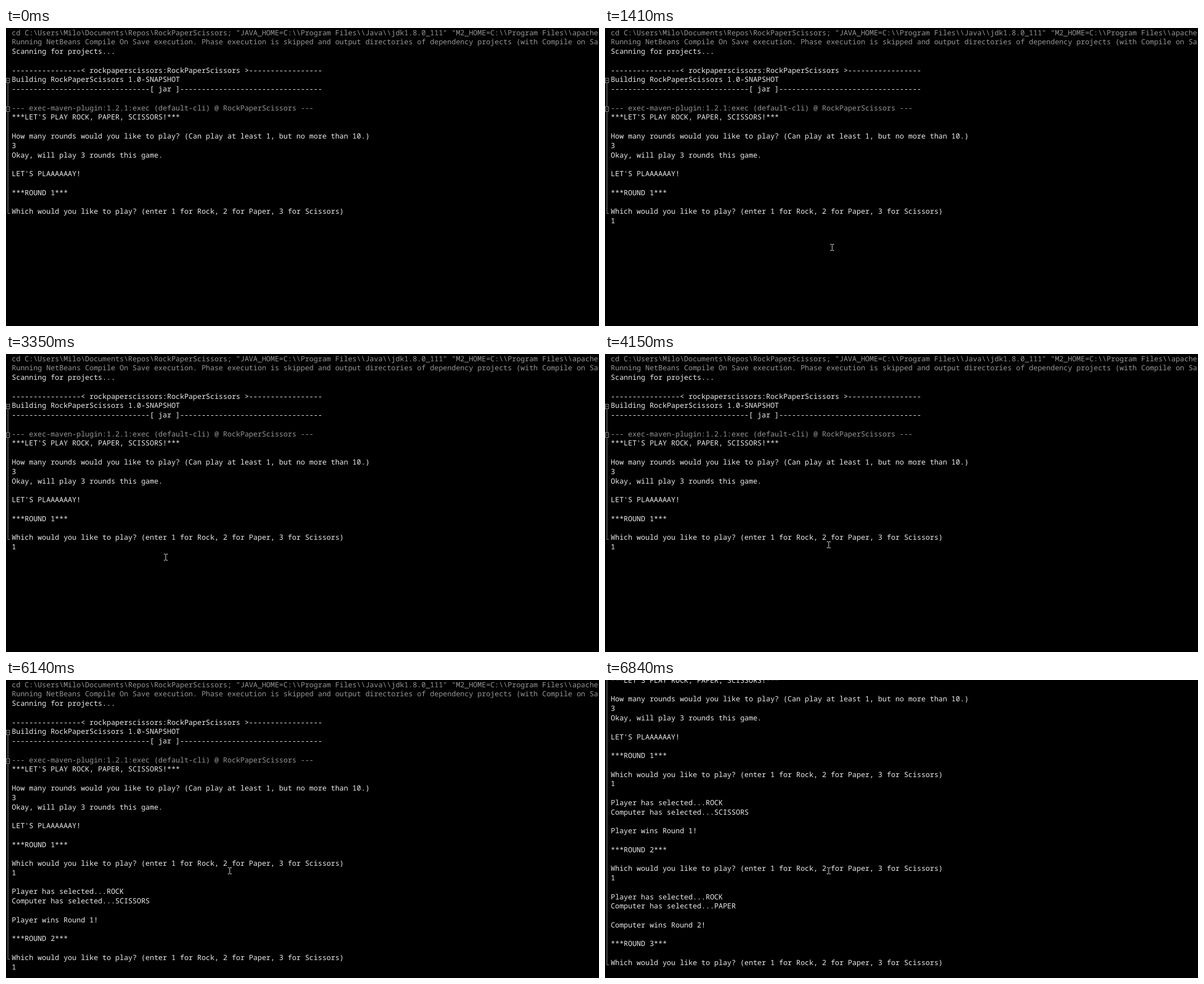
These frames come from a looping animation (1056x531 px, 8 s). An HTML page with a canvas:

```html
<!DOCTYPE html>
<html lang="en">
<head>
<meta charset="utf-8">
<title>Rock, Paper, Scissors console</title>
<style>
html, body { margin: 0; width: 100%; height: 100%; overflow: hidden; background: #000; }
canvas { display: block; }
</style>
</head>
<body>
<canvas id="stage" width="1056" height="531"></canvas>
<script>
const ctx = document.getElementById('stage').getContext('2d', { alpha: false });
const W = 1056, H = 531, LOOP = 8000;
const LEFT = 10.3, BASE = 12.5, PITCH = 16.77;
const FIT = 31, BOTTOM = 23;
const FONT = '12.81px "Noto Sans Mono", "DejaVu Sans Mono", monospace';
const TEXT = '#ececec', DIM = '#969696', GUTTER = '#8c8c8c', POINTER = '#d8d8d8';

const ASK = 'Which would you like to play? (enter 1 for Rock, 2 for Paper, 3 for Scissors)';
const dash = n => '-'.repeat(n);
const round = n => ['', `***ROUND ${n}***`, '', ASK];
const result = (n, computer, winner) => [
  '', 'Player has selected...ROCK', `Computer has selected...${computer}`,
  '', `${winner} wins Round ${n}!`, ...round(n + 1)
];

// Console output: each block appears at its time
const blocks = [
  { time: 0, lines: [
    'cd C:\\Users\\Milo\\Documents\\Repos\\RockPaperScissors; "JAVA_HOME=C:\\\\Program Files\\\\Java\\\\jdk1.8.0_111" "M2_HOME=C:\\\\Program Files\\\\apache',
    'Running NetBeans Compile On Save execution. Phase execution is skipped and output directories of dependency projects (with Compile on Sa',
    'Scanning for projects...',
    '',
    dash(16) + '< rockpaperscissors:RockPaperScissors >' + dash(17),
    'Building RockPaperScissors 1.0-SNAPSHOT',
    dash(32) + '[ jar ]' + dash(33),
    '',
    '--- exec-maven-plugin:1.2.1:exec (default-cli) @ RockPaperScissors ---',
    "***LET'S PLAY ROCK, PAPER, SCISSORS!***",
    '',
    'How many rounds would you like to play? (Can play at least 1, but no more than 10.)',
    '3',
    'Okay, will play 3 rounds this game.',
    '',
    "LET'S PLAAAAAAY!",
    ...round(1)
  ] },
  { time: 1410, lines: ['1'] },
  { time: 4380, lines: result(1, 'SCISSORS', 'Player') },
  { time: 6140, lines: ['1'] },
  { time: 6840, lines: result(2, 'PAPER', 'Computer') }
];
const isDim = line => /^(cd |Running|--- )/.test(line);
const isFold = line => /^(Building|--- )/.test(line);

// Pointer glides: cubic curves sampled in equal steps
const glides = [
  { from: 70, to: 550, steps: 6, x: [498, 430, 380, 404], y: [472, 395, 375, 391] },
  { from: 2800, to: 3590, steps: 10, x: [358, 235, 250, 395], y: [384, 420, 330, 340] }
];
const NUDGE = 3730, BLINK = [700, 800];

function bezier([a, b, c, d], u) {
  const v = 1 - u;
  return a * v ** 3 + 3 * b * v * v * u + 3 * c * v * u * u + d * u ** 3;
}

function pointerAt(t) {
  const glide = glides.findLast(g => g.from <= t);
  if (!glide || (t >= BLINK[0] && t < BLINK[1])) return null;
  const progress = Math.min(1, (t - glide.from) / (glide.to - glide.from));
  const u = Math.floor(progress * glide.steps) / glide.steps;
  return {
    x: Math.round(bezier(glide.x, u)) + (t >= NUDGE ? 3 : 0),
    y: Math.round(bezier(glide.y, u))
  };
}

function drawText(lines, baseline) {
  ctx.font = FONT;
  ctx.textRendering = 'geometricPrecision';
  lines.forEach((line, row) => {
    ctx.fillStyle = isDim(line) ? DIM : TEXT;
    ctx.fillText(line, LEFT, baseline(row));
  });
}

function drawGutter(lines, baseline) {
  const middle = row => Math.round(baseline(row)) - 3;
  const top = middle(lines.findIndex(isFold));
  const end = Math.round(baseline(lines.lastIndexOf(ASK)) - 1.5);
  ctx.fillStyle = GUTTER;
  ctx.fillRect(3, top, 1, end - top + 1);
  ctx.fillRect(3, end, 4, 1);
  lines.forEach((line, row) => {
    if (!isFold(line)) return;
    const y = middle(row);
    ctx.fillStyle = '#000';
    ctx.fillRect(0, y - 4, 7, 9);
    ctx.strokeStyle = ctx.fillStyle = GUTTER;
    ctx.strokeRect(0.5, y - 3.5, 6, 8);
    ctx.fillRect(2, y, 3, 1);
  });
}

function drawPointer({ x, y }) {
  ctx.fillStyle = POINTER;
  ctx.fillRect(x, y - 5, 1, 10);
  for (const edge of [y - 6, y + 5]) {
    ctx.fillRect(x - 3, edge, 3, 1);
    ctx.fillRect(x + 1, edge, 3, 1);
  }
}

function draw(t) {
  const lines = blocks.filter(b => b.time <= t).flatMap(b => b.lines);
  const last = BASE + (lines.length - 1) * PITCH;
  const scroll = lines.length > FIT ? last - (H - BOTTOM) : 0;
  const baseline = row => BASE + row * PITCH - scroll;
  const pointer = pointerAt(t);

  ctx.fillStyle = '#000';
  ctx.fillRect(0, 0, W, H);
  drawText(lines, baseline);
  drawGutter(lines, baseline);
  if (pointer) drawPointer(pointer);
}

const start = performance.now();
function tick() {
  draw((performance.now() - start) % LOOP);
  requestAnimationFrame(tick);
}
tick();
</script>
</body>
</html>
```
